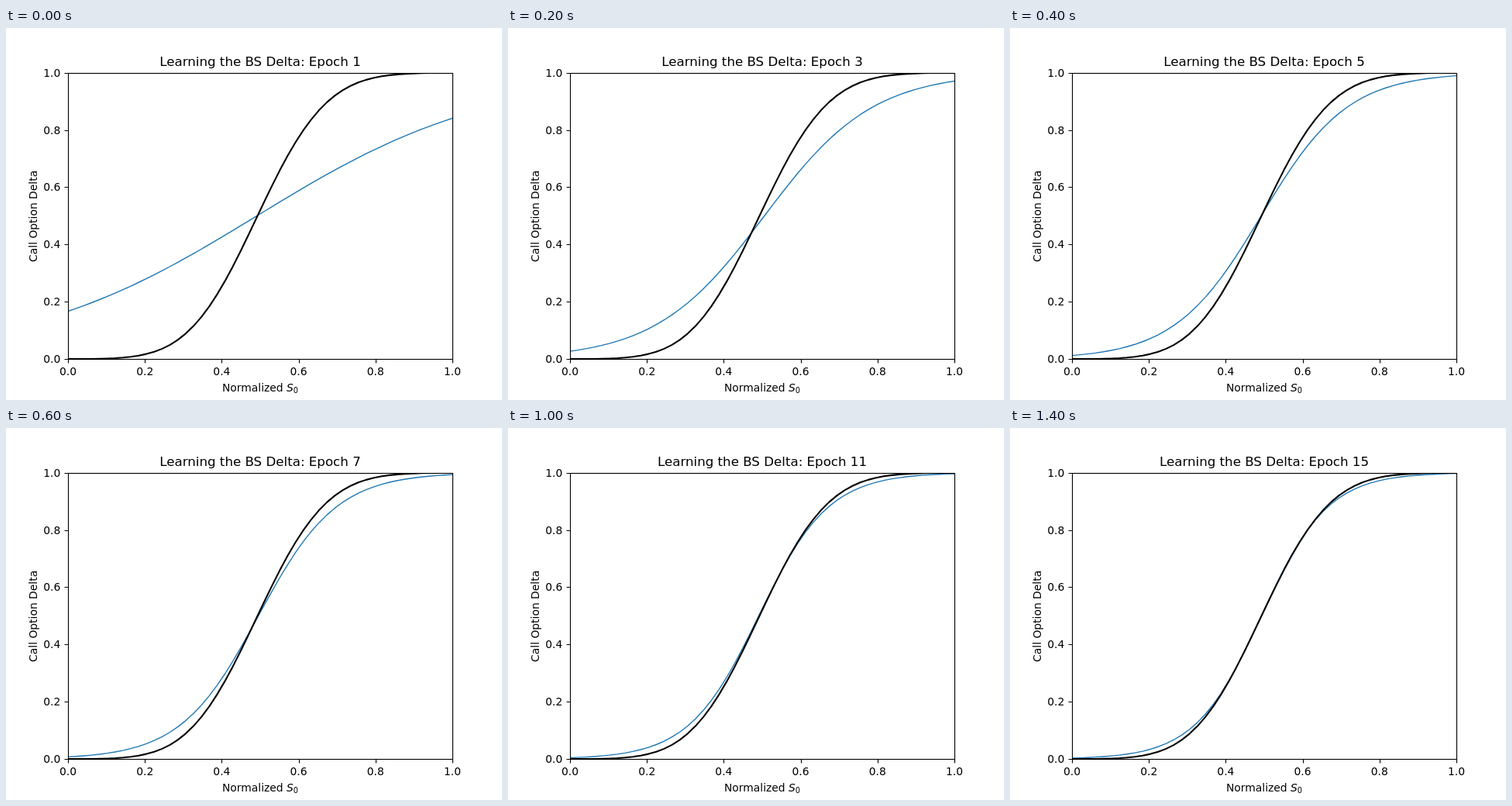
An HTML page for the animation above (1500 ms loop, 640 px wide and 480 px high).

```html
<!DOCTYPE html>
<html lang="en">
<head>
<meta charset="utf-8">
<title>Learning the BS Delta</title>
<style>
  html, body { margin: 0; width: 100%; height: 100%; overflow: hidden; background: #fff; }
  svg { display: block; width: 640px; height: 480px; }
  text { font: 13.89px "DejaVu Sans", sans-serif; fill: #000; text-anchor: middle; }
  #title { font-size: 16.67px; }
  .end { text-anchor: end; }
  .axis { fill: none; stroke: #000; stroke-width: 1.11; }
  .curve { fill: none; stroke-linejoin: round; }
</style>
</head>
<body>
<svg viewBox="0 0 640 480">
  <clipPath id="plot"><rect x="80" y="58" width="496" height="369"/></clipPath>
  <g clip-path="url(#plot)">
    <path id="model" class="curve" stroke="#1f77b4" stroke-width="1.39"/>
    <path id="exact" class="curve" stroke="#000" stroke-width="2.08"/>
  </g>
  <g id="axes"><rect class="axis" x="80.5" y="58.5" width="496" height="369"/></g>
  <text id="title" x="328" y="49"></text>
  <text x="328" y="469">Normalized <tspan font-style="oblique">S</tspan><tspan font-size="9.72" dy="2.2">0</tspan></text>
  <text transform="translate(39.5 242.9) rotate(-90)">Call Option Delta</text>
</svg>
<script>
const $ = id => document.getElementById(id);
const STEP = 100, POINTS = 50;
const px = x => 80 + 496 * x;
const py = y => 427.2 - 369.6 * y;

// Steepness and midpoint of the fitted sigmoid after each epoch
const epochs = [
  [3.27, .4914], [5.2, .499], [7.07, .5057], [8.15, .498], [8.88, .4921],
  [9.42, .494], [9.85, .4954], [10.25, .494], [10.6, .4925], [10.82, .4917],
  [11, .491], [11.16, .4914], [11.3, .4918], [11.43, .4922], [11.55, .4926]
];

function normalCdf(z) {
  const a = Math.abs(z) / Math.SQRT2, t = 1 / (1 + .3275911 * a);
  const poly = t * (.254829592 + t * (-.284496736 + t * (1.421413741 + t * (-1.453152027 + t * 1.061405429))));
  const tail = poly * Math.exp(-a * a) / 2;
  return z < 0 ? tail : 1 - tail;
}

function exactDelta(x) {
  const u = x - .493;
  return normalCdf(7.1 * u - .6 * u * u);
}

function curve(f) {
  const pts = Array.from({ length: POINTS }, (_, i) => {
    const x = i / (POINTS - 1);
    return px(x).toFixed(2) + ' ' + py(f(x)).toFixed(2);
  });
  return 'M' + pts.join('L');
}

let axes = '';
for (let i = 0; i <= 5; i++) {
  const v = i / 5, label = v.toFixed(1);
  const x = Math.round(px(v)) + .5, y = Math.round(py(v)) + .5;
  axes += `<path class="axis" d="M${x} 427.5v5M80.5 ${y}h-5"/>
    <text x="${px(v)}" y="448">${label}</text>
    <text class="end" x="70.3" y="${Math.round(py(v) + 5)}">${label}</text>`;
}
$('axes').insertAdjacentHTML('beforeend', axes);
$('exact').setAttribute('d', curve(exactDelta));

let shown = -1;
function draw() {
  const i = Math.floor(performance.now() / STEP) % epochs.length;
  if (i !== shown) {
    const [slope, mid] = epochs[i];
    $('model').setAttribute('d', curve(x => 1 / (1 + Math.exp(-slope * (x - mid)))));
    $('title').textContent = `Learning the BS Delta: Epoch ${i + 1}`;
    shown = i;
  }
  requestAnimationFrame(draw);
}
draw();
</script>
</body>
</html>
```
